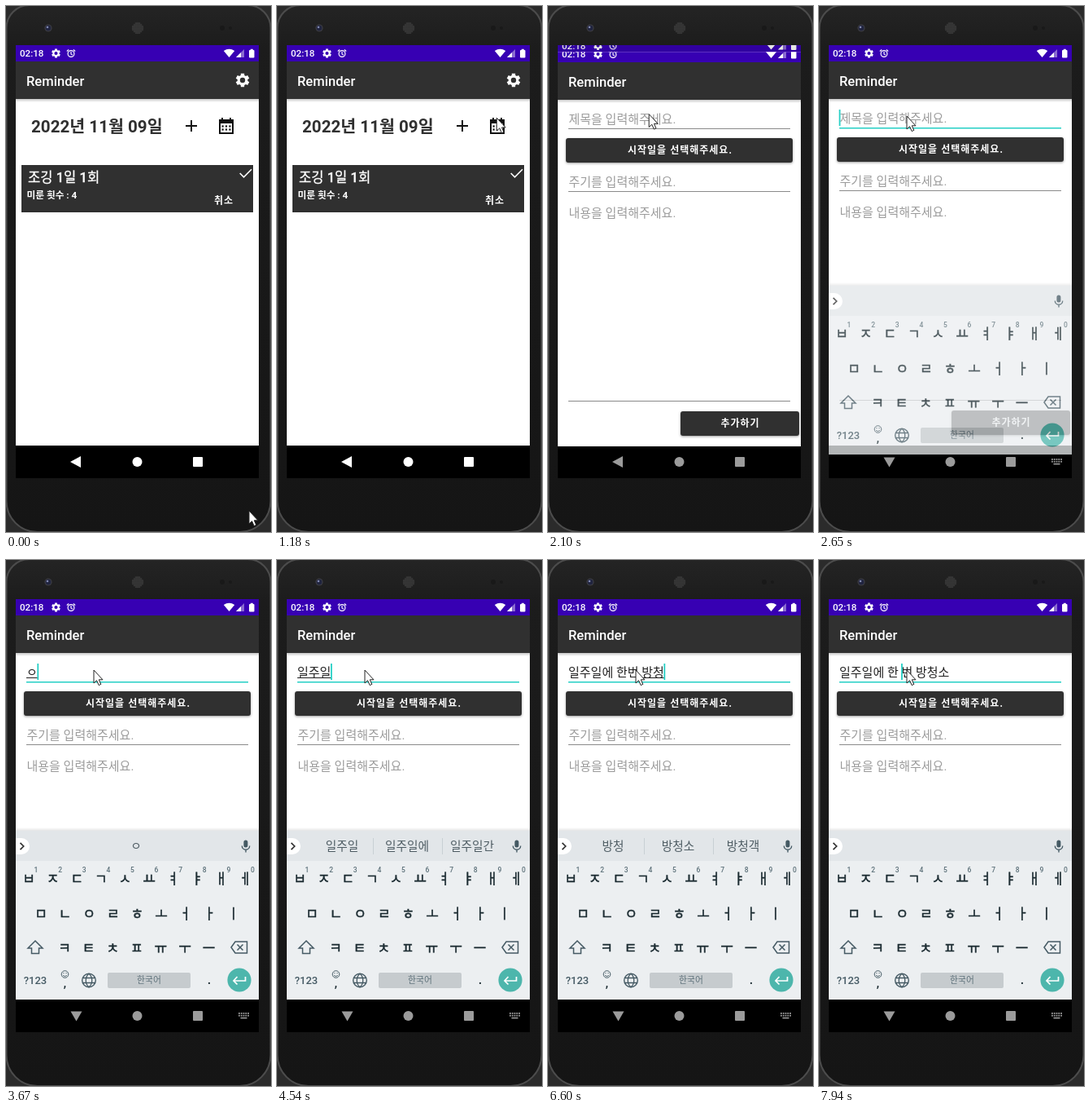
These frames come from a looping animation (326 by 645 pixels, 8 s). An HTML page with a canvas:

```html
<!DOCTYPE html>
<html lang="ko">
<head>
<meta charset="utf-8">
<title>Reminder</title>
<style>
html, body { margin: 0; width: 100%; height: 100%; overflow: hidden; background: #2b2b2b; }
canvas { display: block; width: 100vw; height: 100vh; }
</style>
</head>
<body>
<canvas id="stage"></canvas>
<script>
const W = 326, H = 645, LOOP = 8000;
const SCREEN = { x: 12, y: 48, w: 299, h: 531 };
const NAV_Y = 539, KEYS_Y = 332;
const DARK = '#303030', SLATE = '#455a64', TEAL = '#4db6ac', FOCUS = '#25cfc5';
const FAMILY = 'Roboto, "Noto Sans CJK KR", "Noto Sans CJK", sans-serif';
const OPEN_AT = 1797, OPEN_MS = 425, KEYS_AT = 2590, KEYS_MS = 190, FOCUS_AT = 2300;

const canvas = document.getElementById('stage');
const layer = document.createElement('canvas');
const main = canvas.getContext('2d');
let ctx = main;

// time, committed text, composing text, suggestions, caret steps back from the end
const TYPING = [
  [0, '', '', ''],
  [3050, '', 'ㅇ', ''],
  [3120, '', 'ㅇ', 'ㅇ'],
  [3320, '', 'ㅇㄹ', '을 ㅇㄹ 일'],
  [3670, '', 'ㅇ', 'ㅇ'],
  [3800, '', '이', '이 이런 일'],
  [4000, '', '일', '일 일단 일어나'],
  [4130, '', '일ㅈ', '일ㅈ 일정 일주일'],
  [4200, '', '일주', '일주 일주일 일주일에'],
  [4340, '', '일중', '일중 일중에 일중독'],
  [4400, '', '일주이', '일주이 일주일 일주일에'],
  [4540, '', '일주일', '일주일 일주일에 일주일간'],
  [4800, '', '일주일ㅇ', '일주일ㅇ 일주일에 일주일은'],
  [5000, '', '일주일에', '일주일에 일주일에도 일주일엔'],
  [5200, '일주일에 ', '', '일주일에 일주일이 '],
  [5460, '일주일에 ', 'ㅎ', 'ㅎ ㅎㅎ 하'],
  [5530, '일주일에 ', '하', '하 하고 한'],
  [5660, '일주일에 ', '한', '한 한번 한국'],
  [5800, '일주일에 ', '한ㅂ', '한ㅂ 한번 한번은'],
  [5930, '일주일에 ', '한버', '한버 한번 한번도'],
  [6000, '일주일에 ', '한번', '한번 한번은 한번도'],
  [6130, '일주일에 한번 ', '', '한번 한번에 '],
  [6220, '일주일에 한번 ', 'ㅂ', 'ㅂ 방 바로'],
  [6280, '일주일에 한번 ', '바', '바 바로 방'],
  [6350, '일주일에 한번 ', '방', '방 방법 방문'],
  [6480, '일주일에 한번 ', '방ㅊ', '방ㅊ 방청 방침'],
  [6540, '일주일에 한번 ', '방처', '방처 방청 방청소'],
  [6600, '일주일에 한번 ', '방청', '방청 방청소 방청객'],
  [6800, '일주일에 한번 ', '방청소', '방청소'],
  [7080, '일주일에 한번 방청소', '', ''],
  [7200, '일주일에 한번 방청소', '', '', 1],
  [7300, '일주일에 한번 방청소', '', '', 2],
  [7410, '일주일에 한번 방청소', '', '', 3],
  [7610, '일주일에 한번 방청소', '', '', 4],
  [7740, '일주일에 한번 방청소', '', '', 5],
  [7940, '일주일에 한 번 방청소', '', '', 5]
];

const clamp = v => Math.max(0, Math.min(1, v));
const span = (t, from, ms) => clamp((t - from) / ms);
const mix = (a, b, p) => a + (b - a) * p;
const smooth = p => p * p * (3 - 2 * p);
const cubic = (a, b, c, d, s) => {
  const r = 1 - s;
  return a * r * r * r + 3 * b * r * r * s + 3 * c * r * s * s + d * s * s * s;
};

// Value at x on a curve running through points of four x and four y
function curve(xs, ys, x) {
  let lo = 0, hi = 1;
  for (let i = 0; i < 24; i++) {
    const mid = (lo + hi) / 2;
    if (cubic(...xs, mid) < x) lo = mid; else hi = mid;
  }
  return cubic(...ys, lo);
}
const fastOutSlowIn = p => curve([0, .4, .2, 1], [0, 0, 1, 1], p);
const extraSlowIn = p => p < 1 / 6
  ? curve([0, .05, .1333, .1667], [0, 0, .06, .4], p)
  : curve([.1667, .2083, .25, 1], [.4, .82, 1, 1], p);

function rect(x, y, w, h, color) {
  ctx.fillStyle = color;
  ctx.fillRect(x, y, w, h);
}
function box(x, y, w, h, r, color) {
  ctx.fillStyle = color;
  ctx.beginPath();
  ctx.roundRect(x, y, w, h, r);
  ctx.fill();
}
function disc(x, y, r, color) {
  ctx.fillStyle = color;
  ctx.beginPath();
  ctx.arc(x, y, r, 0, 7);
  ctx.fill();
}
function ring(x, y, r, color, width) {
  ctx.strokeStyle = color;
  ctx.lineWidth = width;
  ctx.beginPath();
  ctx.arc(x, y, r, 0, 7);
  ctx.stroke();
}
function fillPath(x, y, d, color) {
  ctx.save();
  ctx.translate(x, y);
  ctx.fillStyle = color;
  ctx.fill(new Path2D(d));
  ctx.restore();
}
function strokePath(x, y, d, color, width) {
  ctx.save();
  ctx.translate(x, y);
  ctx.strokeStyle = color;
  ctx.lineWidth = width;
  ctx.stroke(new Path2D(d));
  ctx.restore();
}
function text(str, x, y, size, color, opt = {}) {
  ctx.font = `${opt.weight || 400} ${size}px ${FAMILY}`;
  ctx.textAlign = opt.align || 'left';
  ctx.letterSpacing = (opt.spacing || 0) + 'px';
  ctx.fillStyle = color;
  ctx.fillText(str, x, y);
  if (opt.outline) {
    ctx.strokeStyle = color;
    ctx.lineWidth = opt.outline;
    ctx.strokeText(str, x, y);
  }
  ctx.letterSpacing = '0px';
}
const centered = (str, x, y, size, color, weight) =>
  text(str, x, y, size, color, { weight, align: 'center' });

function gear(x, y, r, color) {
  ctx.fillStyle = color;
  ctx.beginPath();
  for (let i = 0; i < 6; i++) {
    const a = (i + 1) * Math.PI / 3;
    for (const [da, k] of [[-.36, .74], [-.25, 1], [.25, 1], [.36, .74]])
      ctx.lineTo(x + Math.sin(a + da) * r * k, y - Math.cos(a + da) * r * k);
  }
  ctx.closePath();
  ctx.moveTo(x + r * .37, y);
  ctx.arc(x, y, r * .37, 0, 7);
  ctx.fill('evenodd');
}

function phone() {
  rect(0, 0, W, H, '#2b2b2b');
  const body = ctx.createLinearGradient(0, 0, 0, H);
  body.addColorStop(0, '#242424');
  body.addColorStop(.08, '#1c1c1c');
  body.addColorStop(1, '#151515');
  box(.5, -1, 325, 646, [28, 28, 38, 38], body);
  ctx.strokeStyle = '#4c4c4c';
  ctx.lineWidth = 2;
  ctx.beginPath();
  ctx.roundRect(.5, -1, 325, 646, [28, 28, 38, 38]);
  ctx.stroke();
  disc(52, 27, 4.6, '#3a3a40');
  disc(52, 27, 3.2, '#20243f');
  disc(51, 26, 1.3, '#8088b0');
  disc(162, 27, 7.5, '#262626');
  for (let i = -3; i <= 3; i++)
    for (let j = -3; j <= 3; j++)
      if (i * i + j * j < 11) disc(162 + i * 2, 27 + j * 2, .6, '#686868');
  disc(266, 27, 3, '#191919');
  disc(276, 27, 2, '#191919');
}

function statusBar() {
  rect(12, 48, 299, 20, '#3700b3');
  text('02:18', 17, 62, 11.6, '#fff', { weight: 500 });
  gear(61.5, 58, 5.6, '#fff');
  ring(80, 58.5, 3.9, '#fff', 1.2);
  strokePath(80, 58.5, 'M0 -2.4V.4L2 1.6M-5.2 -3L-2.8 -5M5.2 -3L2.8 -5', '#fff', 1.1);
  fillPath(274.5, 53, 'M0 10L-6.7 2Q0 -2.6 6.7 2Z', '#fff');
  fillPath(283, 53, 'M0 10L10 0V10Z', '#8a6bd0');
  fillPath(283, 53, 'M0 10L6 4V10Z', '#fff');
  box(299, 54, 6.5, 9.5, 1, '#fff');
  rect(300.8, 52.8, 3, 2, '#fff');
}

function appBar(withGear) {
  const shade = ctx.createLinearGradient(0, 114, 0, 118);
  shade.addColorStop(0, 'rgba(0,0,0,.22)');
  shade.addColorStop(1, 'rgba(0,0,0,0)');
  rect(12, 114, 299, 4, shade);
  rect(12, 68, 299, 46, DARK);
  text('Reminder', 25, 97.5, 16.6, '#fff', { weight: 500 });
  if (withGear) gear(291, 91, 8.6, '#fff');
}

function listScreen(t) {
  rect(12, 48, 299, NAV_Y - 48, '#fff');
  statusBar();
  appBar(true);
  text('2022년 11월 09일', 31, 154.5, 20.6, DARK, { weight: 700 });
  const press = span(t, 1500, 180);
  if (press > 0) box(209, 131, 37, 31, 2, `rgba(0,0,0,${.12 * press})`);
  strokePath(228, 147, 'M-7 0H7M0 -7V7', '#111', 2);
  strokePath(271, 148, 'M-8 -8H8V8H-8ZM-5 -11V-7M5 -11V-7', '#111', 2);
  rect(263, 140, 16, 4, '#111');
  for (let i = 0; i < 6; i++)
    rect(265.5 + i % 3 * 4.4, 146.4 + (i > 2 ? 4 : 0), 2.2, 2.2, '#111');
  rect(19, 195, 285, 58, DARK);
  text('조깅 1일 1회', 27, 216, 16.6, '#fff', { weight: 500, outline: .3 });
  text('미룬 횟수 : 4', 25.5, 236, 11.7, '#fff', { weight: 700 });
  text('취소', 256, 242.5, 12, '#fff', { weight: 700, spacing: 1 });
  strokePath(287, 198, 'M.7 7L5.5 11.8L15 2.2', '#fff', 1.6);
}

function button(x, y, w, label, textX) {
  ctx.save();
  ctx.shadowColor = 'rgba(0,0,0,.4)';
  ctx.shadowBlur = 3;
  ctx.shadowOffsetY = 1;
  box(x, y, w, 30, 3, DARK);
  ctx.restore();
  text(label, textX, y + 19.3, 12, '#fff', { weight: 700, spacing: 1 });
}

function formScreen(t) {
  rect(12, 48, 299, NAV_Y - 48, '#fff');
  statusBar();
  appBar(false);
  const hint = (str, y) => text(str, 25.5, y, 15, '#9c9c9c');
  const line = y => rect(25, y, 273, 1, '#8a8a8a');
  const [, done, live, , back = 0] = typed(t);
  const all = done + live;
  if (all) text(all, 25, 142.5, 15, '#222');
  else hint('제목을 입력해주세요.', 142.5);
  ctx.font = `400 15px ${FAMILY}`;
  const width = str => ctx.measureText(str).width;
  if (live) rect(25 + width(done), 144, width(live), 1, '#222');
  if (t > FOCUS_AT) {
    rect(25, 149, 273, 1.5, FOCUS);
    rect(24.6 + width(all.slice(0, all.length - back)), 127, 1.8, 20, FOCUS);
  } else line(149);
  button(22, 161, 279, '시작일을 선택해주세요.', 98);
  hint('주기를 입력해주세요.', 220);
  line(226);
  hint('내용을 입력해주세요.', 257.5);
  line(483);
  button(163, 496, 146, '추가하기', 212.5);
}

function typed(t) {
  let row = TYPING[0];
  for (const next of TYPING) if (next[0] <= t) row = next;
  return row;
}

function suggestions(t) {
  const list = typed(t)[3].split(' ');
  const word = (str, x) => centered(str, x, 356.3, 14.7, '#4f5d64');
  if (list.length === 1) return word(list[0], 160);
  list.forEach((str, i) => word(str, 80 + 80 * i));
  for (const x of [118, 203]) rect(x, 341, 1, 20, '#c8d0d4');
}

function keyRow(keys, x, y) {
  [...keys].forEach((key, i) =>
    text(key, x + i * 29.6, y + 6.5, 17, '#1b2b31', { align: 'center', outline: .45 }));
}

function keyboard(t) {
  const shade = ctx.createLinearGradient(0, KEYS_Y - 4, 0, KEYS_Y);
  shade.addColorStop(0, 'rgba(0,0,0,0)');
  shade.addColorStop(1, 'rgba(0,0,0,.1)');
  rect(12, KEYS_Y - 4, 299, 4, shade);
  rect(12, KEYS_Y, 299, NAV_Y - KEYS_Y, '#eceff1');
  rect(12, KEYS_Y, 299, 37, '#e2e6e9');
  box(2, 341, 27, 20, 10, '#fff');
  strokePath(20, 351, 'M-2.5 -4.2L1.7 0L-2.5 4.2', '#333', 1.7);
  box(292.4, 343.5, 5, 9, 2.5, SLATE);
  strokePath(295, 351, 'M-4.7 -.5A4.7 4.7 0 0 0 4.7 -.5M0 4.2V7.4', SLATE, 1.4);
  suggestions(t);

  keyRow('ㅂㅈㄷㄱㅅㅛㅕㅑㅐㅔ', 28, 390);
  [...'1234567890'].forEach((n, i) => centered(n, 37 + i * 29.6, 383, 8.5, '#5c7079', 500));
  keyRow('ㅁㄴㅇㄹㅎㅗㅓㅏㅣ', 43, 433);
  keyRow('ㅋㅌㅊㅍㅠㅜㅡ', 72, 475);
  strokePath(36, 475, 'M0 -8L9 1H4.5V7.5H-4.5V1H-9Z', SLATE, 1.5);
  strokePath(287, 475, 'M-10 0L-5 -7H9.5V7H-5ZM-2.5 -3.5L4.5 3.5M4.5 -3.5L-2.5 3.5', SLATE, 1.5);

  centered('?123', 36, 520, 13, SLATE, 500);
  ring(72.5, 508, 4.3, SLATE, 1);
  strokePath(72.5, 508, 'M-2.2 1A2.4 2.4 0 0 0 2.2 1M-1.6 -2V-.8M1.6 -2V-.8', SLATE, 1);
  centered(',', 72.5, 524, 15, '#1b2b31', 500);
  ring(102, 515.5, 8.3, SLATE, 1.4);
  strokePath(102, 515.5, 'M-8 -3H8M-8 3H8M0 -8.3C-5 -4 -5 4 0 8.3C5 4 5 -4 0 -8.3', SLATE, 1.3);
  box(125, 506, 102, 19, 2, '#c6cbce');
  centered('한국어', 176, 519.3, 10.8, '#5f727b');
  centered('.', 250, 520, 16, '#1b2b31', 500);
  disc(287, 515, 14.6, TEAL);
  strokePath(287, 515, 'M7.5 -4V1H-6.5M-2.5 -4L-7 1L-2.5 5.5', '#fff', 1.7);
}

// Fades the keyboard as one sheet, so that its parts do not show through each other
function fadingKeyboard(t, alpha) {
  layer.width = canvas.width;
  layer.height = canvas.height;
  const sheet = layer.getContext('2d');
  sheet.setTransform(main.getTransform());
  ctx = sheet;
  keyboard(t);
  ctx = main;
  ctx.save();
  ctx.resetTransform();
  ctx.globalAlpha = alpha;
  ctx.drawImage(layer, 0, 0);
  ctx.restore();
}

function navBar(t) {
  rect(12, NAV_Y, 299, 40, '#000');
  const keysUp = t >= KEYS_AT;
  const v = Math.round(mix(255, 155, span(t, OPEN_AT, 100)));
  const color = `rgb(${v},${v},${v})`;
  fillPath(86.5, 559, keysUp ? 'M-7 -5.5H7L0 6.5Z' : 'M-7.5 0L5.5 -7V7Z', color);
  disc(161.5, 559, 6, color);
  box(230, 553, 12, 12, 1, color);
  if (!keysUp) return;
  for (let i = 0; i < 10; i++)
    rect(286 + i % 5 * 2.8, 555 + (i > 4 ? 2.8 : 0), 1.8, 1.8, color);
  rect(288.5, 560.8, 8, 1.6, color);
}

function pointerAt(t) {
  if (t < 830) {
    const p = smooth(span(t, 40, 790));
    const bend = (a, b, c) => mix(mix(a, b, p), mix(b, c, p), p);
    return [bend(299, 93, 283), bend(619, 310, 148)];
  }
  const stops = [[830, 283, 148], [970, 275, 136], [1110, 275, 136], [1460, 229, 147],
    [1680, 226, 146], [1880, 154, 128], [2230, 108, 135]];
  for (let i = 1; i < stops.length; i++) {
    const [t0, x0, y0] = stops[i - 1], [t1, x1, y1] = stops[i];
    if (t < t1) {
      const p = smooth(span(t, t0, t1 - t0));
      return [mix(x0, x1, p), mix(y0, y1, p)];
    }
  }
  return [108, 135];
}

function pointer(t) {
  const [x, y] = pointerAt(t);
  const arrow = 'M0 0V16L3.6 12.7L6.2 18.6L8.8 17.4L6.3 11.8H11Z';
  fillPath(x, y, arrow, '#fff');
  strokePath(x, y, arrow, '#222', 1);
}

function screen(t) {
  const p = span(t, OPEN_AT, OPEN_MS);
  const slide = fastOutSlowIn(p), reveal = extraSlowIn(p);
  navBar(t);
  if (p < 1) {
    ctx.save();
    ctx.beginPath();
    ctx.rect(12, 48, 299, NAV_Y - 48);
    ctx.clip();
    ctx.translate(0, -.019 * SCREEN.h * slide);
    listScreen(t);
    ctx.restore();
    if (p > 0) rect(12, 48, 299, NAV_Y - 48, `rgba(0,0,0,${Math.min(.1, .126 * reveal)})`);
  }
  if (p > 0) {
    ctx.save();
    ctx.translate(0, Math.round(.041 * SCREEN.h * (1 - slide)));
    ctx.beginPath();
    ctx.rect(12, 48 + .959 * SCREEN.h * (1 - reveal), 299, SCREEN.h);
    ctx.clip();
    formScreen(t);
    ctx.restore();
  }
  const k = span(t, KEYS_AT, KEYS_MS);
  if (k > 0) {
    ctx.save();
    ctx.translate(0, Math.round(23 * (1 - k) ** 2));
    fadingKeyboard(t, clamp(k * 2.4));
    ctx.restore();
  }
}

function draw(now) {
  let t = now % LOOP;
  // The first part advances in steps of 70 ms
  if (t < 2800) t = Math.max(0, Math.floor((t + 10) / 70) * 70 - 10);
  const w = Math.round(innerWidth * devicePixelRatio), h = Math.round(innerHeight * devicePixelRatio);
  if (canvas.width !== w || canvas.height !== h) {
    canvas.width = w;
    canvas.height = h;
  }
  ctx.setTransform(w / W, 0, 0, h / H, 0, 0);
  phone();
  ctx.save();
  ctx.beginPath();
  ctx.rect(SCREEN.x, SCREEN.y, SCREEN.w, SCREEN.h);
  ctx.clip();
  screen(t);
  ctx.restore();
  pointer(t);
}

const start = performance.now();
function tick() {
  draw(performance.now() - start);
  requestAnimationFrame(tick);
}
tick();
</script>
</body>
</html>
```
